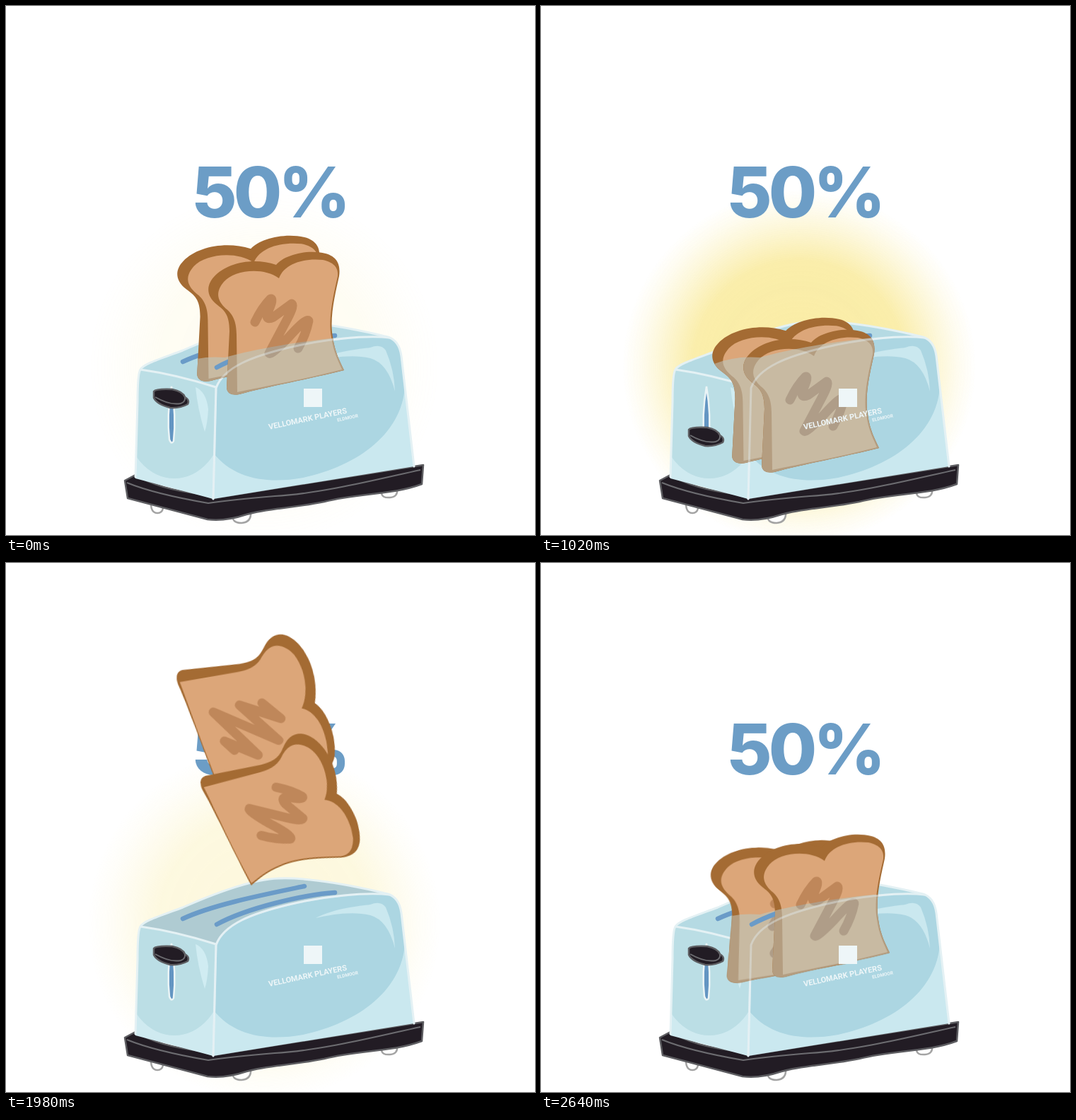
These frames come from a looping animation (748x748 px, 2670 ms). An HTML page without scripts:

```html
<!DOCTYPE html>
<html lang="en">
<head>
<meta charset="utf-8">
<title>Toaster</title>
<style>
  html, body { margin: 0; width: 100%; height: 100%; overflow: hidden; background: #fff; }
  svg { display: block; width: 100vw; height: 100vh; }

  .glow, .lever, .top, .rise, .spin { animation: 2670ms linear infinite; }
  .glow { animation-name: glow; animation-timing-function: ease-in-out; }
  .lever { animation-name: lever; }
  .top { fill: #b5dae3; animation-name: top; animation-timing-function: step-end; }
  .front .rise { animation-name: front-rise; }
  .back .rise { animation-name: back-rise; }
  .front .spin { animation-name: front-spin; transform-origin: 380px 558px; }
  .back .spin { animation-name: back-spin; transform-origin: 343px 543px; }

  /* Bread colours in the open and behind the glass. */
  svg { --crust: #a46b33; --crumb: #dca679; --mark: #bf875a; }
  .inside { --crust: #b49d80; --crumb: #c8baa2; --mark: #af9d88; }
  .crust { fill: var(--crust); }
  .crumb { fill: var(--crumb); }
  .mark { fill: none; stroke: var(--mark); stroke-width: 13; stroke-linecap: round; stroke-linejoin: round; }

  .edge { fill: none; stroke: #e4f1f4; stroke-width: 3; stroke-linecap: round; stroke-linejoin: round; }
  .slot { fill: none; stroke: #6a9bc8; stroke-width: 6.5; stroke-linecap: round; }
  .black { fill: #221c24; stroke: #5d5d61; stroke-width: 2.5; stroke-linejoin: round; }
  .wire { fill: none; stroke: #6c6c70; stroke-width: 2; }
  .foot { fill: #fff; stroke: #a3a3a3; stroke-width: 2.5; }
  .sign { fill: #eef6f8; font-family: Roboto, sans-serif; font-weight: 700; }

  @keyframes glow {
    0% { opacity: .12; }
    10.5% { opacity: 1; }
    26.5% { opacity: .72; }
    49.5% { opacity: 1; }
    66.3% { opacity: .8; }
    80.5%, 100% { opacity: 0; }
  }
  @keyframes lever {
    0%, 71%, 100% { transform: none; }
    8.4%, 67.4% { transform: translateY(54px); }
  }
  @keyframes top {
    0%, 93%, 100% { fill: #b5dae3; }
    71% { fill: #afcbd2; }
  }
  /* Throws follow a parabola: quadratic ease out, then in. */
  @keyframes front-rise {
    0% { transform: translateY(-110px); }
    10.2% { transform: none; }
    61.4% { transform: none; animation-timing-function: cubic-bezier(.333, .667, .667, 1); }
    81.8% { transform: translateY(-248px); animation-timing-function: cubic-bezier(.333, 0, .667, .333); }
    100% { transform: translateY(-51px); }
  }
  @keyframes back-rise {
    0% { transform: translateY(-116px); }
    9.6% { transform: none; }
    62.7% { transform: none; animation-timing-function: cubic-bezier(.333, .667, .667, 1); }
    81.4% { transform: translateY(-393px); animation-timing-function: cubic-bezier(.333, 0, .667, .333); }
    100% { transform: translateY(-7px); }
  }
  @keyframes front-spin {
    0%, 66.7% { transform: none; }
    83.1% { transform: translateX(17px) rotate(166deg); }
    98.8%, 100% { transform: translateX(15px) rotate(360deg); }
  }
  @keyframes back-spin {
    0%, 66.7% { transform: none; }
    83.1% { transform: translateX(23px) rotate(177deg); }
    98.8%, 100% { transform: translateX(-4px) rotate(362deg); }
  }
</style>
</head>
<body>
<svg viewBox="0 0 748 748">
  <defs>
    <radialGradient id="halo">
      <stop offset="0" stop-color="#f9e995"/>
      <stop offset=".6" stop-color="#f9e995" stop-opacity=".92"/>
      <stop offset=".7" stop-color="#f9e995" stop-opacity=".66"/>
      <stop offset=".8" stop-color="#f9e995" stop-opacity=".4"/>
      <stop offset=".9" stop-color="#f9e995" stop-opacity=".17"/>
      <stop offset="1" stop-color="#f9e995" stop-opacity="0"/>
    </radialGradient>

    <clipPath id="glass">
      <path d="M150 748V530L190 522L245 506Q275 494 310 497C340 488 400 476 470 469L560 474L620 748Z"/>
    </clipPath>
    <clipPath id="front-shape">
      <path id="front-face" d="M293 697L297 540C308 510 350 495 400 483C450 471 510 465 542 469Q557 474 560 500L577 651Z"/>
    </clipPath>
    <clipPath id="side-shape">
      <path id="side-face" d="M183 668L186 560Q186 520 190 514Q240 521 297 539L293 697Z"/>
    </clipPath>

    <g id="slice">
      <path class="crust" d="M312 650L316 570C316 545 308 540 298 532C283 520 283 505 294 493C312 473 350 465 382 476C392 463 425 453 452 460C470 465 473 478 471 492C466 515 457 550 462 578C465 600 472 612 478 625C430 637 370 648 330 659Q313 662 312 650Z"/>
      <path class="crumb" d="M327 656L326 575C326 555 320 545 311 538C297 525 297 513 308 500C322 484 362 478 386 495C393 475 420 466 448 469C466 473 470 482 469 492C464 515 455 550 460 578C463 600 470 612 475 624C420 638 370 647 327 656Z"/>
    </g>
    <g id="front-slice">
      <use href="#slice"/>
      <path class="mark" d="M352 557Q362 536 374 524Q379 523 371 541Q365 556 378 550L404 531Q408 533 398 552L372 601Q375 604 400 578Q424 551 428 555Q424 575 413 594"/>
    </g>
    <g id="back-slice">
      <use href="#slice" transform="translate(242 441) scale(1.085 1.02) translate(-286 -458)"/>
      <path class="mark" d="M394 582L379 594L406 550L336 603L390 518L332 565L360 510L334 533"/>
    </g>
  </defs>

  <circle class="glow" cx="365" cy="510" r="250" fill="url(#halo)"/>
  <text x="373" y="299" text-anchor="middle" fill="#6c9dc6" font-family="Inter, sans-serif" font-size="99" font-weight="800" letter-spacing="-5">50%</text>

  <g class="foot">
    <path d="M205 706Q206 717 214 717Q222 717 222 708"/>
    <path d="M321 720Q319 731 333 731Q347 730 346 716"/>
    <path d="M531 688Q531 696 543 695Q554 694 553 684"/>
  </g>
  <path class="black" d="M168 671L183 663Q215 683 275 690L293 696L380 682L590 649L588 676C545 692 500 688 450 701C400 711 370 710 340 719Q310 729 285 726L172 696Z"/>
  <path class="wire" d="M171 674Q210 690 286 703Q320 698 380 693C450 689 530 668 586 656"/>

  <path class="top" d="M190 514C195 506 215 500 250 487C300 465 350 447 385 446C430 444 500 458 540 468L545 472C510 466 450 471 400 483C350 495 308 510 297 539Q240 521 190 514Z"/>
  <use href="#side-face" fill="#cfeaf0"/>
  <ellipse cx="238" cy="588" rx="68" ry="80" fill="#bbdee5" clip-path="url(#side-shape)"/>
  <path fill="#bbdee5" d="M187 560Q187 522 190 514Q240 521 297 539L296 620H185Z"/>
  <path fill="#d0ecf2" d="M268 539Q283 545 286 570Q285 590 281 602Q271 570 268 539Z"/>
  <use href="#front-face" fill="#cae8ef"/>
  <path fill="#acd6e2" clip-path="url(#front-shape)" d="M280 610C305 665 360 678 420 667C500 650 568 600 564 525L570 450H280Z"/>
  <path fill="#cae8ef" d="M438 502C465 488 500 485 515 483Q530 477 537 487Q549 515 550 545Q540 505 515 498C490 492 460 497 438 502Z"/>
  <path class="edge" d="M183 666L186 560Q186 520 190 514C195 506 215 500 250 487C300 465 350 447 385 446C430 444 500 458 540 468Q556 473 559 495L577 651M190 514Q240 521 297 539"/>
  <path id="front-edge" class="edge" d="M293 697L297 540C308 510 350 495 400 483C450 471 510 465 542 469"/>

  <path class="slot" d="M250 503C295 482 375 467 422 457"/>
  <g class="back">
    <g class="rise"><g class="spin"><use href="#back-slice"/></g></g>
    <g class="inside" clip-path="url(#glass)">
      <g class="rise"><g class="spin"><use href="#back-slice"/></g></g>
    </g>
  </g>
  <path class="slot" d="M298 511C340 488 420 469 465 466"/>
  <g class="front">
    <g class="rise"><g class="spin"><use href="#front-slice"/></g></g>
    <g class="inside" clip-path="url(#glass)">
      <g class="rise"><g class="spin"><use href="#front-slice"/></g></g>
    </g>
  </g>
  <g clip-path="url(#glass)"><use href="#front-edge" opacity=".4"/></g>

  <path fill="#6395c2" stroke="#eaf4f6" stroke-width="2.5" d="M234 538Q241 580 237 615Q234 621 231 613Q227 580 234 538Z"/>
  <g class="lever">
    <path class="black" d="M209 545Q212 541 235 542Q250 545 253 553Q260 557 257 563Q246 569 232 568Q213 563 209 554Z"/>
    <path class="wire" d="M211 553Q232 565 247 562Q254 560 253 553"/>
  </g>

  <g class="sign">
    <rect x="421" y="541" width="26" height="26"/>
    <g transform="translate(372 599) rotate(-12)">
      <text font-size="11">VELLOMARK PLAYERS</text>
      <text x="97" y="9" font-size="6.5">ELDMOOR</text>
    </g>
  </g>
</svg>
</body>
</html>
```
